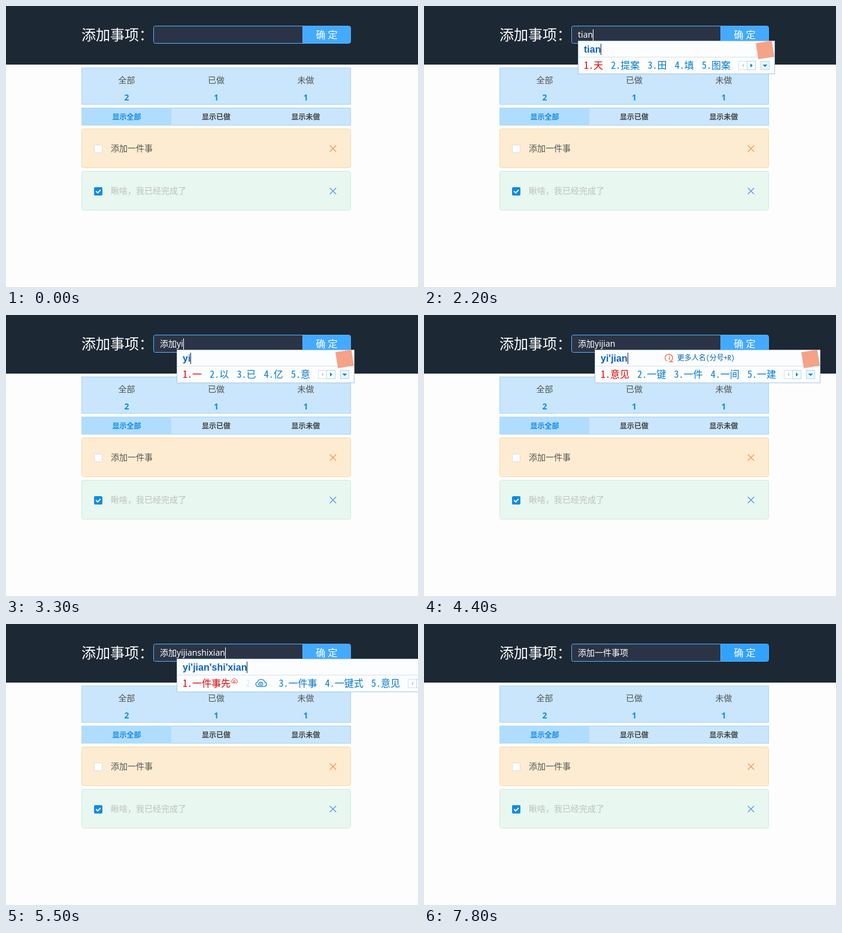
These frames come from a looping animation (688x470 px, 8000 ms). An HTML page:

```html
<!DOCTYPE html>
<html lang="zh-CN">
<head>
<meta charset="utf-8">
<style>
html, body { margin: 0; width: 100%; height: 100%; overflow: hidden; background: #fdfdfd; }
svg { display: block; width: 688px; height: 470px; }
text { font: 14px "Noto Sans", "Noto Sans CJK SC", sans-serif; white-space: pre; }
.mid { text-anchor: middle; }
.title { font-size: 24px; fill: #fff; }
.ok { font-size: 16px; font-weight: 500; fill: #fff; }
.num { font-size: 14px; font-weight: 700; fill: #148ae6; }
.tab { font-size: 12px; font-weight: 700; }
.field { fill: #fff; }
.spell { font: bold 16px "Liberation Sans", sans-serif; fill: #0a60c4; }
.cand { font: 300 16px "Noto Sans Mono CJK SC", "Noto Sans CJK SC", monospace; fill: #0079cf; }
.cand.first { fill: #e00000; }
.hint { font: 12px "Noto Sans Mono CJK SC", "Noto Sans CJK SC", monospace; fill: #0062bb; }
</style>
</head>
<body>
<svg viewBox="0 0 688 470">
  <g id="page"></g>
  <g id="live"></g>
</svg>
<script>
const LOOP = 8000;
const FIELD_X = 257;
const pen = document.createElement('canvas').getContext('2d');
const FIELD_FONT = '14px "Noto Sans", "Noto Sans CJK SC", sans-serif';
const SPELL_FONT = 'bold 16px "Liberation Sans", sans-serif';

const rect = (x, y, w, h, fill, more = '') =>
  `<rect x="${x}" y="${y}" width="${w}" height="${h}" fill="${fill}" ${more}/>`;
const box = (x, y, w, h, fill, line, r = 0) =>
  rect(x + .5, y + .5, w - 1, h - 1, fill, `stroke="${line}" rx="${r}"`);
const text = (x, y, cls, str, more = '') =>
  `<text x="${x}" y="${y}" class="${cls}" ${more}>${str}</text>`;
const path = (d, line, w = 1, more = '') =>
  `<path d="${d}" fill="none" stroke="${line}" stroke-width="${w}" ${more}/>`;

function widthOf(str, font) {
  pen.font = font;
  return pen.measureText(str).width;
}

// Page

function item(y, fill, line, cross, label, ink, done) {
  const mark = done
    ? rect(147, y + 27, 14, 14, '#148ae6', 'rx="2"') +
      path(`M150.3 ${y + 33.8}l2.8 2.8 4.8-5`, '#fff', 2)
    : box(147, y + 27, 14, 14, '#fff', '#d8dbe0', 2);
  return box(126, y, 450, 66, fill, line, 3) + mark +
    text(175, y + 38, '', label, `fill="${ink}"`) +
    path(`M540.7 ${y + 28.2}l10.6 10.6m0-10.6l-10.6 10.6`, cross, 1.3);
}

function page() {
  const cols = [['全部', 2], ['已做', 1], ['未做', 1]];
  let out = rect(0, 0, 688, 470, '#fdfdfd') + rect(0, 0, 688, 98, '#1d2835') +
    text(126, 57, 'title', '添加事项：') +
    box(246, 33, 330, 30, '#2b3446', '#58b2ff', 3) +
    box(126, 103, 450, 62, '#c9e6fd', '#a2d4fb') +
    box(126, 170, 450, 30, '#c9e6fd', '#a2d4fb') +
    rect(126, 170, 150, 30, '#b0dcfe');
  cols.forEach(([name, n], i) => {
    const x = 201.5 + i * 149.5;
    out += text(x, 129, 'mid', name, 'fill="#555"') +
      text(x, 158, 'mid num', n) +
      text(x, 190, 'mid tab', '显示' + name, `fill="${i ? '#444' : '#148ae6'}"`);
  });
  return out +
    item(205, '#fdecd1', '#fbdaa6', '#f39a5c', '添加一件事', '#555', false) +
    item(276, '#e8f7f0', '#caeedd', '#5f94f0', '瞅啥，我已经完成了', '#bcc2c0', true);
}

// Typing script: [start, committed text, spelling, candidates, hint start]
const PAIRS = '添加 天假 填加 天价 田家';
const VIEWS = '意见 一键 一件 一间 一建';
const EVENTS = '一件事 一件 意见 一键 一间';
const STEPS = [
  [0, '', ''],
  [1800, '', 't', '他 她 它 天 听'],
  [2000, '', 'ti', '题 提 体 替 踢'],
  [2200, '', 'tian', '天 提案 田 填 图案'],
  [2400, '', "tian'ji", '天际 天机 天极 田鸡 天籍'],
  [2500, '', "tian'jia", PAIRS, 2800],
  [3000, '添加', ''],
  [3300, '添加', 'yi', '一 以 已 亿 意'],
  [3600, '添加', "yi'j", '一句 依据 一家 一级 已经'],
  [3700, '添加', "yi'jia", '一家 一价 议价 溢价 衣架'],
  [3800, '添加', "yi'jian", VIEWS, 4100],
  [4800, '添加', "yi'jian's", EVENTS],
  [5000, '添加', "yi'jian'sh", '一件事 一键式 意见 一件 一间'],
  [5100, '添加', "yi'jian'shi", '一件事 一键式 一间室 意见 一件'],
  [5300, '添加', "yi'jian'shi'x", '一件事需 * 一件事 一键式 意见'],
  [5400, '添加', "yi'jian'shi'xia", '一件事下 * 一件事 一键式 意见'],
  [5500, '添加', "yi'jian'shi'xian", '一件事先 * 一件事 一键式 意见'],
  [5600, '添加', "yi'jian'shi'xiang", '一件事项 * 一件事 一键式 意见'],
  [6100, '添加一件事项', '']
];

const caretGaps = [[0, 600], [1100, 1600], [4400, 4800], [6600, 7100], [7500, LOOP]];
const within = (t, [a, b]) => t >= a && t < b;

// Popup

function cloud(x, y, size, ink, alpha = 1) {
  const d = 'M-5 4.5a3.4 3.4 0 0 1-.6-6.7a5.6 5.6 0 0 1 10.8.2a3.3 3.3 0 0 1 .2 6.5z' +
    'M-2.4 3.6a3 3 0 1 1 4.6-2.2a1.7 1.7 0 1 1-2.2-1.8';
  return path(d, ink, 1.3,
    `transform="translate(${x} ${y}) scale(${size})" opacity="${alpha}"`);
}

function hint(x, alpha) {
  const icon = path('M-4.5 5.5a6.3 6.3 0 1 1 4.5 1.1h6.5M0-1v4.5M0-3.8v1.5', '#f0622d', 1.3,
    `transform="translate(${x + 70} 71.5)" opacity="${alpha}"`);
  return icon + text(x + 83, 76, 'hint', '更多人名(分号+R)');
}

function pager(x) {
  return box(x, 92, 15, 15, '#fff', '#cfe4f3') + box(x + 14, 92, 15, 15, '#fff', '#b4d8f0') +
    box(x + 37, 92, 15, 15, '#eaf6fe', '#b4d8f0') +
    `<path d="M${x + 9} 96.500v6l-3-3z" fill="#bccbd6"/>` +
    `<path d="M${x + 20} 96v7l4-3.500z" fill="#1585d0"/>` +
    `<path d="M${x + 40.500} 98h8l-4 4z" fill="#1585d0"/>`;
}

function popup(left, spelling, words, hintAt, t) {
  const start = left + 10;
  const list = words.split(' ');
  const online = list.includes('*');
  let x = start, row = '';
  list.forEach((word, i) => {
    const n = i + 1;
    if (word === '*') {
      const alpha = [1, .75, .5, .75][Math.floor(Math.max(0, t - 5500) / 100) % 4];
      row += text(x, 105, 'cand', n + '.', 'opacity=".12"') +
        cloud(x + 26, 99.5, 1.1, '#2c93d8', alpha);
      x += 42;
    } else {
      row += text(x, 105, i ? 'cand' : 'cand first', `${n}.${word}`);
      x += 16 + word.length * 16;
      if (online && !i) {
        row += cloud(x + 6.5, 95.5, .68, '#e84040');
        x += 12;
      }
    }
    if (n < list.length) x += 13.25;
  });
  const right = Math.round(x + 74);
  const end = start + widthOf(spelling, SPELL_FONT);
  let out = box(left, 58, right - left, 56, '#fcfdff', '#a9c8e2') +
    path(`M${left + 1} 85.5H${right - 1}`, '#d5e4f0') +
    text(start, 78, 'spell', spelling) +
    rect(Math.round(end), 63, 1, 19, '#222') + row + pager(Math.round(x + 13)) +
    rect(right - 30, 60, 27, 27, '#f5a287', `transform="rotate(-9 ${right - 16.5} 73.5)"`);
  if (hintAt && t >= hintAt) {
    out += hint(end, Math.min(1, .25 + .25 * Math.floor((t - hintAt) / 100)));
  }
  return out;
}

function buttonFill(t) {
  if (t < 7400) return '#44aaff';
  if (t < 7500) return '#3ea7ff';
  return t < 7800 ? '#38a4ff' : '#32a2ff';
}

function scene(t) {
  const [, done, spelling, words, hintAt] = STEPS.filter(s => s[0] <= t).pop();
  const typed = done + spelling.replace(/'/g, '');
  let out = rect(495, 34, 80, 28, buttonFill(t)) + rect(495, 34, 1, 28, '#58b2ff') +
    text(535.5, 54, 'mid ok', '确 定') + text(FIELD_X, 53, 'field', typed);
  if (!caretGaps.some(gap => within(t, gap))) {
    const x = Math.round(FIELD_X + widthOf(typed, FIELD_FONT) + .3);
    out += rect(x, 39, 1, 19, '#fff');
  }
  if (spelling) {
    const left = Math.round(FIELD_X + widthOf(done, FIELD_FONT));
    out += popup(left, spelling, words, hintAt, t);
  }
  return out;
}

const live = document.getElementById('live');
let shown = '';

function tick(now) {
  const next = scene(now % LOOP);
  if (next !== shown) live.innerHTML = shown = next;
  requestAnimationFrame(tick);
}

document.getElementById('page').innerHTML = page();
tick(0);
</script>
</body>
</html>
```
